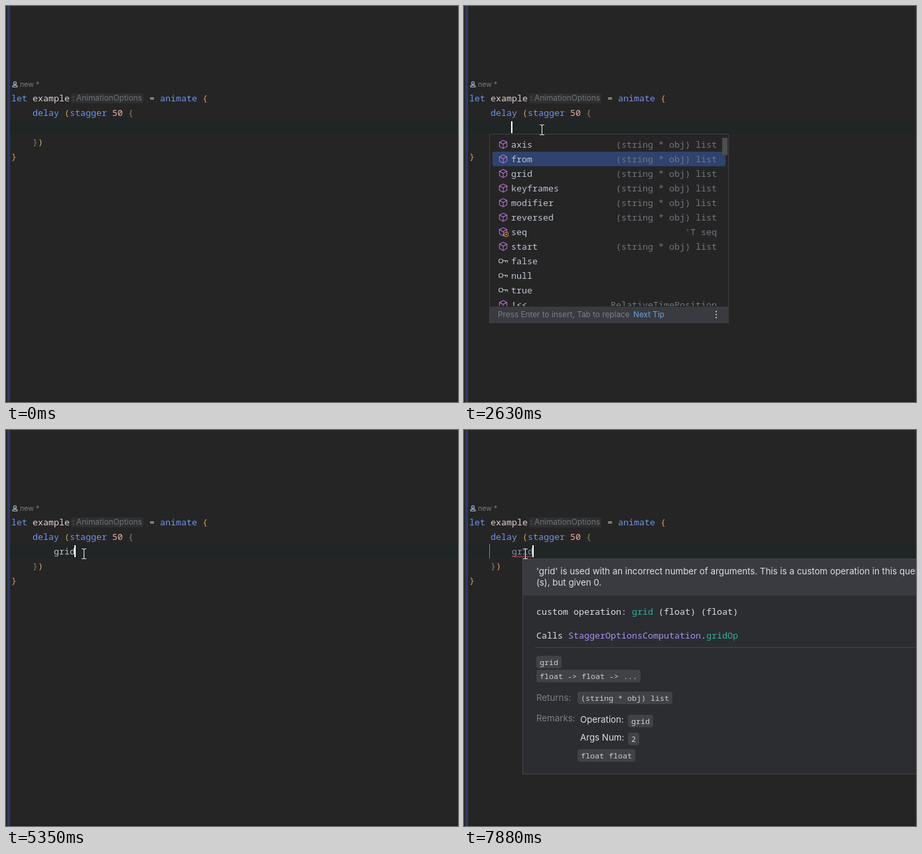
An HTML page for the animation above (8 s loop, 681 by 598 pixels).

```html
<!DOCTYPE html>
<html lang="en">
<head>
<meta charset="utf-8">
<title>Code completion</title>
<style>
  html, body { margin: 0; width: 100%; height: 100%; overflow: hidden; background: #262526; }
  svg { display: block; width: 681px; height: 598px; }
  text { white-space: pre; font-variant-ligatures: none; }
  .code { font: 13.333px "Noto Sans Mono", "DejaVu Sans Mono", monospace; }
  .chip { font: 11.667px "Noto Sans Mono", "DejaVu Sans Mono", monospace; }
  .tip { font: 13.2px Inter, "Open Sans", sans-serif; }
  .doc { font: 13.3px Inter, "Open Sans", sans-serif; }
  .hint { font: 11.8px Inter, "Open Sans", sans-serif; }
  .lens { font: 10.7px Inter, "Open Sans", sans-serif; }
  .code, .chip, .tip, .doc, .hint, .lens { font-feature-settings: "calt" 0, "liga" 0; }
</style>
</head>
<body>
<svg id="stage" viewBox="0 0 681 598" xmlns="http://www.w3.org/2000/svg"></svg>
<script>
const NS = 'http://www.w3.org/2000/svg';
const stage = document.getElementById('stage');
const LOOP = 8000;
const C = {
  key: '#6c95eb', name: '#e0d3d1', plain: '#c4c4c4', num: '#e8b0a4',
  outer: '#de9c58', paren: '#cfa75c', inner: '#7c8866',
  text: '#dcdee2', type: '#a58aea', arg: '#d6c6ee', op: '#39b596',
  panel: '#262526', border: '#3f4043', item: '#bcc5d4', itemType: '#71767f'
};

function add(parent, tag, attrs) {
  const el = document.createElementNS(NS, tag);
  for (const k in attrs) el.setAttribute(k, attrs[k]);
  parent.appendChild(el);
  return el;
}
const group = (parent, attrs = {}) => add(parent, 'g', attrs);
const rect = (parent, x, y, width, height, fill, more = {}) =>
  add(parent, 'rect', { x, y, width, height, fill, ...more });
const line = (parent, d, stroke, width = 1) =>
  add(parent, 'path', { d, stroke, 'stroke-width': width, fill: 'none' });

// parts: alternating string, colour
function text(parent, cls, x, y, parts, more = {}) {
  const el = add(parent, 'text', { class: cls, x, y, ...more });
  for (let i = 0; i < parts.length; i += 2) {
    add(el, 'tspan', { fill: parts[i + 1] }).textContent = parts[i];
  }
  return el;
}

function show(el, on) { el.setAttribute('visibility', on ? 'visible' : 'hidden'); }

function buildEditor() {
  const g = group(stage);
  rect(g, 0, 0, 681, 598, '#262526');
  rect(g, 6, 172, 675, 22, '#202525');
  rect(g, 0, 594, 681, 4, '#232223');
  rect(g, 2, 0, 4, 598, '#2a3b66');

  add(g, 'circle', { cx: 13.5, cy: 116.3, r: 2, fill: 'none', stroke: '#a9c4d6', 'stroke-width': 1.1 });
  line(g, 'M10 122.2V121.2Q10 119.6 12 119.6H15Q17 119.6 17 121.2V122.2Z', '#a9c4d6', 1.1);
  text(g, 'lens', 21, 122, ['new *', '#7b7d81']);

  rect(g, 98, 132, 109, 15, '#2e2f30', { rx: 4 });
  text(g, 'hint', 100, 143, [':', '#717377']);
  text(g, 'hint', 106, 143, ['AnimationOptions', '#717377']);

  text(g, 'code', 8, 144, ['let ', C.key, 'example', C.name]);
  text(g, 'code', 216, 144, ['= ', C.plain, 'animate ', C.key, '{', C.outer]);
  text(g, 'code', 40, 166, ['delay ', C.key, '(', C.paren, 'stagger ', C.key, '50 ', C.num, '{', C.inner]);
  text(g, 'code', 40, 210, ['}', C.inner, ')', C.paren]);
  text(g, 'code', 8, 232, ['}', C.outer]);
}

function buildTyped() {
  const word = text(stage, 'code', 72, 188, ['grid', C.plain]);
  let d = 'M72 192.5';
  for (let x = 74; x <= 104; x += 2) d += `L${x} ${x % 4 ? 190 : 192.5}`;
  const wave = line(stage, d, '#d0453f');
  const guide = line(stage, 'M38.5 172V194', '#4fae52');
  return { word, wave, guide };
}

function cube(parent, y) {
  line(parent, `M59 ${y - 6.2}L64.6 ${y - 3.3}V${y + 3.2}L59 ${y + 6.2}L53.4 ${y + 3.2}V${y - 3.3}Z` +
    `M53.4 ${y - 3.2}L59 ${y - 0.4}L64.6 ${y - 3.2}M59 ${y - 0.4}V${y + 6}`, '#ad70cc', 1.1);
}

function keyIcon(parent, y) {
  add(parent, 'circle', { cx: 55.5, cy: y, r: 3, fill: 'none', stroke: '#b4b6ba', 'stroke-width': 1.2 });
  line(parent, `M58.5 ${y - 0.5}H66M62.5 ${y}V${y + 2}M65.3 ${y}V${y + 2.5}`, '#b4b6ba', 1.2);
}

function buildPopup() {
  const g = group(stage);
  rect(g, 38.5, 193.5, 360, 285, C.panel, { stroke: C.border });
  const mark = rect(g, 43, 198, 351, 22, '#2e436e', { rx: 3 });
  rect(g, 389, 199, 8, 26, '#4d4e51');

  const clip = add(add(stage, 'defs', {}), 'clipPath', { id: 'rows' });
  rect(clip, 39, 194, 359, 259, '#fff');
  const rows = group(g, { 'clip-path': 'url(#rows)' });
  const names = ['axis', 'from', 'grid', 'keyframes', 'modifier', 'reversed',
    'seq', 'start', 'false', 'null', 'true', '!<<'];
  const kinds = { seq: "'T seq", '!<<': 'RelativeTimePosition', false: '', null: '', true: '' };
  names.forEach((name, i) => {
    const y = 209 + i * 22;
    const kind = kinds[name] ?? '(string * obj) list';
    if (kind) cube(rows, y); else keyIcon(rows, y);
    text(rows, 'code', 71, y + 5, [name, C.item]);
    text(rows, 'code', 381, y + 5, [kind, C.itemType], { 'text-anchor': 'end' });
    if (name === 'seq') {
      rect(rows, 60.5, y + 1, 6, 6, C.panel, { stroke: '#dc9a5a', rx: 1.2 });
      rect(rows, 62.5, y + 3, 2, 2, '#dc9a5a');
    }
  });

  rect(g, 39, 454, 360, 25, '#393b40');
  text(g, 'hint', 51, 470, ['Press Enter to insert, Tab to replace', '#7b7f86']);
  text(g, 'hint', 255, 470, ['Next Tip', '#6a9fe0']);
  for (const cy of [461.5, 466, 470.5]) add(g, 'circle', { cx: 380, cy, r: 1.1, fill: '#d0d2d6' });
  return { g, mark };
}

function buildTip(y, width, name, args, argColor, signature) {
  const g = group(stage);
  rect(g, 402.5, y + 0.5, width, 113, C.panel, { stroke: C.border });
  text(g, 'tip', 410, y + 19, ['custom operation: ', C.text, name, C.op, ' (', C.text, args, argColor, ')', C.text]);
  text(g, 'tip', 410, y + 53, ['Calls ', C.text, 'StaggerOptionsComputation', C.type, '.', C.text, name + 'Op', C.op]);
  text(g, 'tip', 410, y + 87, [name, C.text]);
  text(g, 'tip', 410, y + 104, [signature, C.text]);
  return g;
}

function chip(parent, x, y, label) {
  rect(parent, x, y, label.length * 7 + 10, 19, '#404246', { rx: 4 });
  text(parent, 'chip', x + 5, y + 14, [label, '#ccced3']);
}

function buildDoc() {
  const g = group(stage);
  rect(g, 88.5, 194.5, 620, 325, '#2b2d30', { stroke: '#43454a' });
  rect(g, 89, 195, 600, 55, '#393b40');
  text(g, 'doc', 109, 218,
    ["'grid' is used with an incorrect number of arguments. This is a custom operation in this query", C.text]);
  text(g, 'doc', 109, 235, ['(s), but given 0.', C.text]);
  text(g, 'code', 109, 279, ['custom operation: ', C.text, 'grid', '#35ada2', ' (float) (float)', C.text]);
  text(g, 'code', 109, 315,
    ['Calls ', C.text, 'StaggerOptionsComputation', '#a890f5', '.', C.text, 'gridOp', '#35ada2']);
  line(g, 'M107 328.5H681', '#43454a');
  chip(g, 109, 341, 'grid');
  chip(g, 109, 362, 'float -> float -> ...');
  text(g, 'doc', 109, 409, ['Returns:', '#7d8188']);
  chip(g, 171, 395, '(string * obj) list');
  text(g, 'doc', 109, 440, ['Remarks:', '#7d8188']);
  text(g, 'doc', 175, 442, ['Operation:', C.text]);
  chip(g, 247, 430, 'grid');
  text(g, 'doc', 175, 469, ['Args Num:', C.text]);
  chip(g, 247, 457, '2');
  chip(g, 171, 482, 'float float');
  return g;
}

function buildPointer() {
  const g = group(stage);
  const d = 'M-3 -7.5H-1Q0.5 -7.5 0.5 -6V6Q0.5 7.5 -1 7.5H-3M4 -7.5H2Q0.5 -7.5 0.5 -6M4 7.5H2Q0.5 7.5 0.5 6';
  line(g, d, '#111', 2);
  line(g, d, '#f2f2f2', 1.1);
  return g;
}

buildEditor();
const typed = buildTyped();
const caret = rect(stage, 71, 174, 2, 18, '#fff');
const popup = buildPopup();
const tips = [
  { el: buildTip(197, 275, 'axis', 'StaggerAxis', C.arg, 'StaggerAxis -> ...'), from: 2300, to: 2630 },
  { el: buildTip(219, 300, 'from', 'StaggerFrom', C.arg, 'TimePosition -> ...'), from: 3170, to: 4090 },
  { el: buildTip(241, 275, 'grid', 'float) (float', C.text, 'float -> float -> ...'), from: 4620, to: 5350 }
];
const doc = buildDoc();
const pointer = buildPointer();

const within = (t, a, b) => t >= a && t < b;
const CARET_TOGGLES = [260, 1830, 2300, 2830, 3300, 3830, 4290, 4820, 5350, 7350, 7880];
const caretOn = t => CARET_TOGGLES.filter(k => k <= t).length % 2 === 1;

// The pointer moves in 70 ms steps.
function pointerAt(t) {
  if (t >= 6290) return [92, 187];
  if (t >= 6220) return [103, 187];
  if (t >= 1090) return [[88, 104, 117][Math.min(2, Math.floor((t - 1090) / 70))], 187];
  const step = Math.min(10, Math.floor((t - 260) / 70));
  if (step > 8) return [step === 9 ? 71 : 78, 187];
  const u = step / 8;
  const e = u * u * (3 - 2 * u);
  return [Math.round(611 - 544 * e), Math.round(320 - 131 * e)];
}

function render(t) {
  const done = t >= 5350;
  const checked = t >= 5750;
  show(popup.g, within(t, 1830, 5350));
  popup.mark.setAttribute('y', t < 2630 ? 198 : t < 4090 ? 220 : 242);
  for (const tip of tips) show(tip.el, within(t, tip.from, tip.to));

  show(typed.word, done);
  typed.word.firstChild.setAttribute('fill', checked ? '#7f90a6' : C.plain);
  show(typed.wave, checked);
  show(typed.guide, t >= 5830);
  show(doc, t >= 6820);

  show(caret, caretOn(t));
  caret.setAttribute('x', done ? 103 : 71);
  show(pointer, t >= 260);
  pointer.setAttribute('transform', `translate(${pointerAt(t)})`);
}

const start = performance.now();
function tick() {
  render((performance.now() - start) % LOOP);
  requestAnimationFrame(tick);
}
tick();
</script>
</body>
</html>
```
